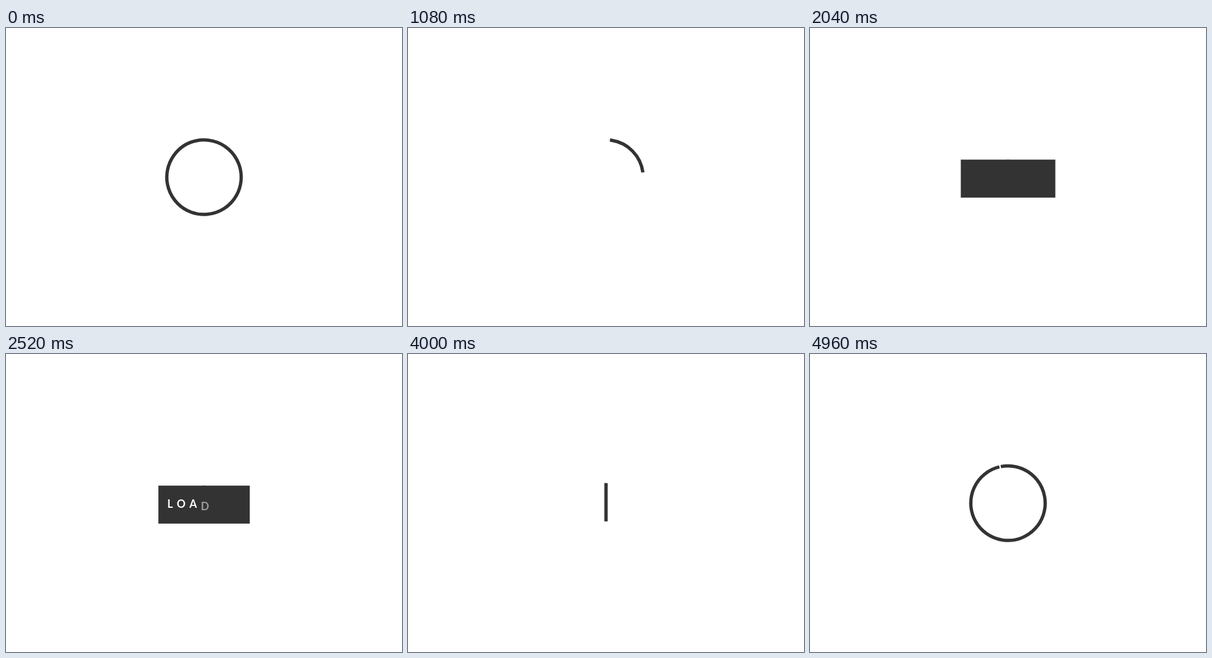
An HTML page for the animation above (5 s loop, 658 px wide and 494 px high).

```html
<!DOCTYPE html>
<html lang="en">
<head>
<meta charset="utf-8">
<title>Loading</title>
<style>
  html, body { margin: 0; width: 100%; height: 100%; overflow: hidden; background: #fff; }
  svg { display: block; width: 658px; height: 494px; }
  text { font: 700 18px Lato, sans-serif; letter-spacing: 6.4px; fill: #fff; }
</style>
</head>
<body>
<svg viewBox="0 0 658 494">
  <path id="stroke" fill="none" stroke="#333" stroke-width="5.5"/>
  <rect id="panel" y="218.2" height="63" fill="#333"/>
  <text id="label" x="268"></text>
</svg>
<script>
const LOOP = 5000, STEP = 40;
const CX = 329, CY = 247.3, R = 61.8;
const LINE_TOP = 218.2, LINE_BOTTOM = 281.2, LINE = LINE_BOTTOM - LINE_TOP;
const LINE_W = 5.5, PANEL_W = 151.8, BASELINE = 255.4;
const SEAM = -102, JOIN = 25;
const DEG = R * Math.PI / 180, TURN = 360 * DEG;

const stroke = document.getElementById('stroke');
const panel = document.getElementById('panel');
const label = document.getElementById('label');
const letters = [...'LOADING'].map(char => {
  const span = document.createElementNS('http://www.w3.org/2000/svg', 'tspan');
  span.textContent = char;
  label.appendChild(span);
  return span;
});

const clamp = x => Math.min(1, Math.max(0, x));
const part = (t, from, to) => clamp((t - from) / (to - from));
const mix = (a, b, x) => a + (b - a) * x;
const smooth = x => x * x * (3 - 2 * x);
const outBack = (x, s) => 1 + (s + 1) * (x - 1) ** 3 + s * (x - 1) ** 2;

function circlePoint(deg) {
  const a = deg * Math.PI / 180;
  return `${CX + R * Math.cos(a)},${CY + R * Math.sin(a)}`;
}

function arcs(from, to) {
  const count = Math.ceil((to - from) / 120);
  let d = '';
  for (let i = 1; i <= count; i++) d += `A${R},${R} 0 0 1 ${circlePoint(mix(from, to, i / count))}`;
  return d;
}

// Circle -> curl below -> centre line, and centre line -> curl above -> circle.
const inPath = `M${circlePoint(SEAM)}${arcs(SEAM, 720 + JOIN)}` +
  `C362,322 329,300 329,${LINE_BOTTOM}L329,${LINE_TOP}`;
const outPath = `M329,${LINE_BOTTOM}L329,${LINE_TOP}` +
  `C329,194.6 362,172.6 ${circlePoint(-JOIN)}${arcs(-JOIN, 720 + SEAM)}`;

function lengthOf(d) {
  stroke.setAttribute('d', d);
  return stroke.getTotalLength();
}
const inLength = lengthOf(inPath), outLength = lengthOf(outPath);

// Starts at rest, passes `via` at 680 ms and brakes evenly until 1720 ms.
function travel(t, from, via, to) {
  const rise = 560, brake = 1040;
  if (t >= 680) return to - (to - via) * (1 - part(t, 680, 680 + brake)) ** 2;
  const x = part(t, 120 - STEP / 2, 680);
  const tangent = 2 * (to - via) / brake * rise;
  return from + (via - from) * smooth(x) + tangent * (x ** 3 - x ** 2);
}

function drawStroke(d, tail, head) {
  stroke.setAttribute('d', d);
  stroke.setAttribute('stroke-dasharray', `0 ${tail} ${head - tail} 9999`);
}

function render(t) {
  if (t < 120) {
    drawStroke(inPath, 0, TURN + 1);
  } else if (t < 3000) {
    drawStroke(inPath,
      travel(t, 0, 431 * DEG, inLength - LINE),
      travel(t, TURN, 537 * DEG, inLength));
  } else {
    drawStroke(outPath,
      mix(0, outLength - TURN, smooth(part(t, 3955, 4800))),
      mix(LINE, outLength, smooth(part(t, 3955, LOOP))));
  }

  const open = t < 3000 ? outBack(part(t, 1760, 2200), 1) : 1 - smooth(part(t, 3760, 3960));
  const width = mix(LINE_W, PANEL_W, open);
  panel.setAttribute('x', CX + 0.1 - width / 2);
  panel.setAttribute('width', width);
  panel.setAttribute('visibility', t > 1760 && t < 3960 ? 'visible' : 'hidden');

  const fade = 1 - part(t, 3680, 3840);
  letters.forEach((span, i) => {
    const shown = part(t, 2200 + i * 80, 2360 + i * 80);
    span.setAttribute('y', BASELINE + 7.5 * (1 - shown));
    span.setAttribute('fill-opacity', shown * fade);
  });
}

const start = performance.now();
function frame() {
  const t = (performance.now() - start) % LOOP;
  render(Math.floor(t / STEP) * STEP);
  requestAnimationFrame(frame);
}
frame();
</script>
</body>
</html>
```
